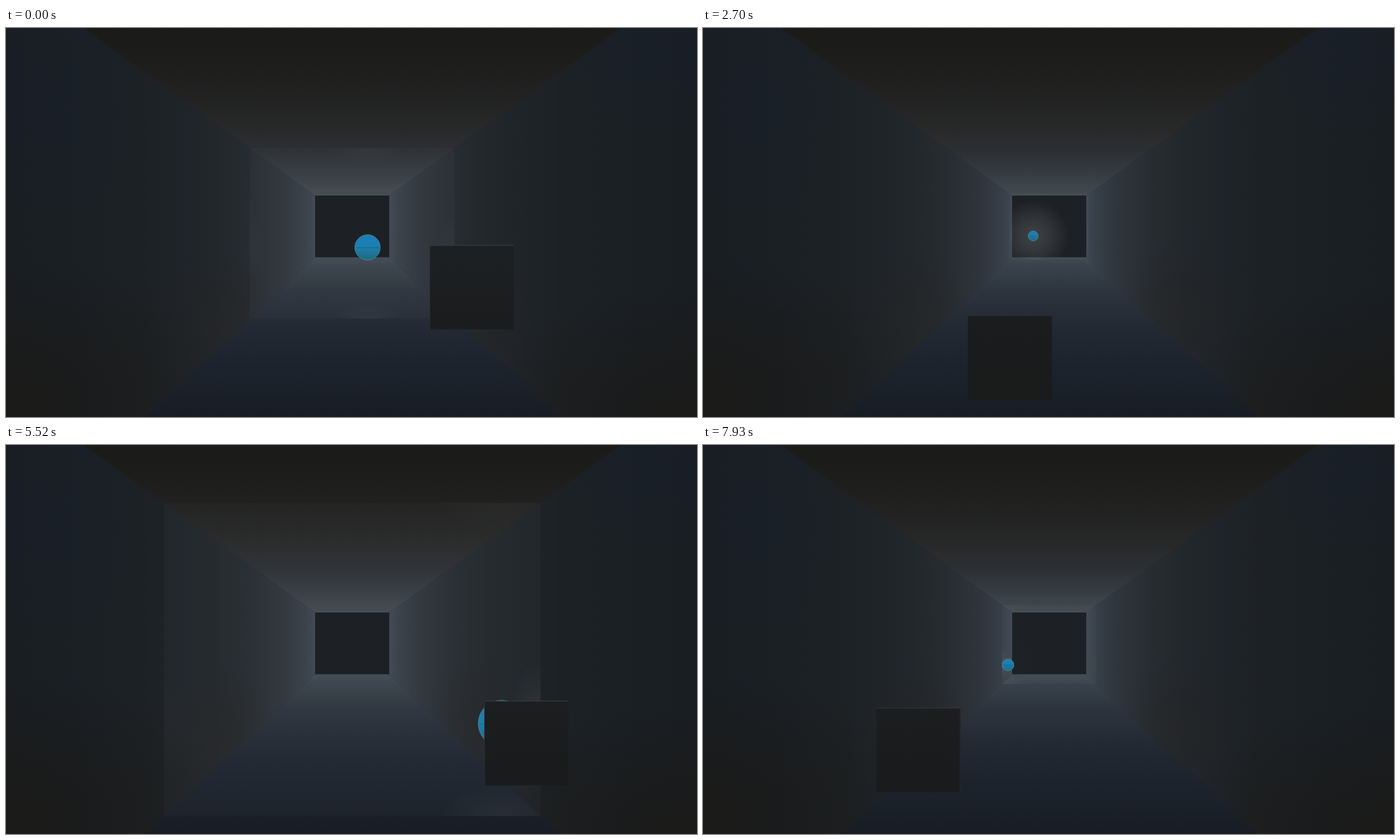
Recreate the animation shown at these times as an HTML page with a canvas. Size 997 px wide and 562 px high, loop 8000 ms.

```html
<!DOCTYPE html>
<html lang="en">
<head>
<meta charset="utf-8">
<title>Tunnel ball</title>
<style>
html, body { margin: 0; width: 100%; height: 100%; overflow: hidden; background: #1a1d20; }
canvas { display: block; }
</style>
</head>
<body>
<canvas id="stage" width="997" height="562"></canvas>
<script>
const W = 997, H = 562, LOOP = 8000;
const ctx = document.getElementById('stage').getContext('2d');

// Vanishing point and tunnel half sizes, measured at the far wall (depth 1)
const VX = 499.5, VY = 281;
const SIDE = 53.5, TOP = 38.8, BOTTOM = 50.2, RADIUS = 6.6;
const PADDLE = 121.5;

const clamp = (v, a, b) => Math.min(b, Math.max(a, v));

function ring(s) {
  return { l: VX - SIDE * s, r: VX + SIDE * s, t: VY - TOP * s, b: VY + BOTTOM * s };
}

function fillPoly(g, points, fill) {
  g.beginPath();
  points.forEach(([x, y]) => g.lineTo(x, y));
  g.closePath();
  g.fillStyle = fill;
  g.fill();
}

// The four faces between the far wall and scale s
function faces(s) {
  const n = ring(s), f = ring(1);
  return {
    left: [[n.l, n.t], [f.l, f.t], [f.l, f.b], [n.l, n.b]],
    right: [[n.r, n.t], [f.r, f.t], [f.r, f.b], [n.r, n.b]],
    ceiling: [[n.l, n.t], [n.r, n.t], [f.r, f.t], [f.l, f.t]],
    floor: [[n.l, n.b], [n.r, n.b], [f.r, f.b], [f.l, f.b]]
  };
}

// stops: [pixel position, colour]
function ramp(g, stops, horizontal) {
  const a = stops[0][0], b = stops[stops.length - 1][0];
  const grad = horizontal ? g.createLinearGradient(a, 0, b, 0) : g.createLinearGradient(0, a, 0, b);
  stops.forEach(([p, c]) => grad.addColorStop((p - a) / (b - a), c));
  return grad;
}

function blob(g, x, y, rx, ry, rgb, alpha) {
  g.save();
  g.translate(x, y);
  g.scale(rx, ry);
  const grad = g.createRadialGradient(0, 0, 0, 0, 0, 1);
  grad.addColorStop(0, `rgba(${rgb},${alpha})`);
  grad.addColorStop(0.5, `rgba(${rgb},${alpha * 0.55})`);
  grad.addColorStop(1, `rgba(${rgb},0)`);
  g.fillStyle = grad;
  g.fillRect(-1, -1, 2, 2);
  g.restore();
}

const wallStops = [
  [0, '#3e4852'], [14, '#373f48'], [45, '#2f353c'], [95, '#272c31'], [145, '#22272c'],
  [195, '#1f2429'], [245, '#1d2124'], [315, '#1b2025'], [446, '#191e23']
];
const ceilingStops = [
  [0, '#1a1b19'], [60, '#1e1e1d'], [100, '#222222'], [140, '#272828'],
  [180, '#2d3033'], [210, '#353b41'], [242, '#434b52']
];
const floorStops = [
  [331, '#424b54'], [345, '#39424b'], [380, '#2d343d'], [419, '#252c35'],
  [450, '#202731'], [490, '#1c232c'], [530, '#1a2028'], [562, '#181d25']
];

function buildRoom() {
  const room = document.createElement('canvas');
  room.width = W;
  room.height = H;
  const g = room.getContext('2d');
  const f = faces(14), back = ring(1);
  g.fillStyle = '#1b1f23';
  g.fillRect(0, 0, W, H);
  fillPoly(g, f.left, ramp(g, wallStops.map(([d, c]) => [back.l - d, c]), true));
  fillPoly(g, f.right, ramp(g, wallStops.map(([d, c]) => [back.r + d, c]), true));
  // Lower parts of the side walls lose their blue and darken
  blob(g, 0, 540, 330, 210, '27,26,24', 0.95);
  blob(g, W, 560, 330, 190, '27,26,24', 0.95);
  blob(g, 300, 420, 90, 110, '38,35,32', 0.4);
  blob(g, 690, 410, 90, 110, '38,35,32', 0.4);
  blob(g, 60, 110, 150, 150, '24,31,42', 0.5);
  blob(g, 930, 40, 130, 90, '24,31,42', 0.6);
  fillPoly(g, f.ceiling, ramp(g, ceilingStops));
  fillPoly(g, f.floor, ramp(g, floorStops));
  g.fillStyle = '#1d2125';
  g.fillRect(446, 242, 107, 89);
  return room;
}
const room = buildRoom();

// The picture advances in short holds of about 108 ms
const BEATS = [210, 1090, 1950, 2800, 3670, 4530, 5410, 6290, 7160];
function heldTime(t) {
  if (t < BEATS[0]) return 0;
  const start = BEATS.filter(b => b <= t).pop();
  return start + Math.min(7, Math.floor((t - start) / 105)) * 108.5;
}

function bounce(t, hit, span, speed, lo) {
  const u = Math.abs((t - hit) * speed) % (2 * span);
  return lo + (u < span ? span - u : u - span);
}

function ballAt(ms) {
  if (ms < BEATS[0]) return { x: 8, y: 13, s: 2.766 };
  const t = ms / 1000, reach = SIDE - RADIUS;
  const depth = bounce(t, 2.52, 0.8125, 0.2635, 0.1745);
  return { x: bounce(t, 1.03, 2 * reach, 40.8, -reach), y: 12.7 + 2.03 * t, s: 1 / depth };
}

// Paddle corner: time, x, y
const PATH = [
  [0, 611, 314], [210, 616, 322], [600, 714, 397], [980, 735, 340], [1350, 791, 318],
  [1840, 611, 314], [2300, 470, 348], [2700, 384, 416], [3050, 290, 423], [3560, 195, 345],
  [3880, 283, 314], [4420, 520, 346], [4900, 640, 405], [5300, 689, 398], [5520, 690, 370],
  [5850, 664, 434], [6180, 562, 369], [6510, 416, 314], [6800, 361, 215], [7160, 470, 280],
  [7400, 488, 315], [7930, 247, 381], [8000, 230, 388]
];

// Cubic through the points, with slopes flattened at turning points
function paddleAt(ms) {
  let i = 0;
  while (i < PATH.length - 2 && PATH[i + 1][0] <= ms) i++;
  const a = PATH[i], b = PATH[i + 1], d = b[0] - a[0], u = clamp((ms - a[0]) / d, 0, 1);
  const slope = (k, c) => {
    const p = PATH[k - 1], q = PATH[k], n = PATH[k + 1];
    if (!p || !n) return 0;
    const m0 = (q[c] - p[c]) / (q[0] - p[0]), m1 = (n[c] - q[c]) / (n[0] - q[0]);
    return m0 * m1 <= 0 ? 0 : 2 * m0 * m1 / (m0 + m1);
  };
  const at = c => {
    const v = u * u * (3 - 2 * u), w = u * (1 - u);
    return a[c] + (b[c] - a[c]) * v + d * w * ((1 - u) * slope(i, c) - u * slope(i + 1, c));
  };
  return { x: Math.round(at(1)), y: Math.round(at(2)) };
}

// The ball lights only what lies farther away than itself
function drawLight(ball) {
  const { x, y, s } = ball, n = ring(s), f = faces(s);
  const bx = VX + x * s, by = VY + y * s, wide = 18 * s, deep = 9 * s;
  const spots = {
    left: [n.l, by, deep, wide, SIDE + x],
    right: [n.r, by, deep, wide, SIDE - x],
    ceiling: [bx, n.t, wide, deep, TOP + y],
    floor: [bx, n.b, wide, deep, BOTTOM - y]
  };
  for (const name in spots) {
    const [cx, cy, rx, ry, gap] = spots[name];
    ctx.save();
    ctx.beginPath();
    f[name].forEach(([px, py]) => ctx.lineTo(px, py));
    ctx.clip();
    ctx.fillStyle = 'rgba(190,200,205,0.025)';
    ctx.fillRect(0, 0, W, H);
    blob(ctx, cx, cy, rx, ry, '205,210,210', 0.11 * Math.exp(-gap / 40));
    ctx.restore();
  }
  const near = clamp((1 / s - 0.7) / 0.25, 0, 1);
  if (near > 0) {
    ctx.save();
    ctx.beginPath();
    ctx.rect(446, 242, 107, 89);
    ctx.clip();
    blob(ctx, bx, by, 52, 52, '200,200,200', 0.24 * near ** 3);
    ctx.restore();
  }
}

function drawBall(ball) {
  const x = VX + ball.x * ball.s, y = VY + ball.y * ball.s, r = RADIUS * ball.s;
  ctx.beginPath();
  ctx.arc(x, y, r, 0, 2 * Math.PI);
  ctx.fillStyle = ramp(ctx, [[y - r, '#1b7db8'], [y, '#1c7fb0'], [y + r, '#1d6a7c']]);
  ctx.fill();
  ctx.lineWidth = 1;
  ctx.strokeStyle = '#3e88a2';
  ctx.stroke();
  ctx.beginPath();
  ctx.moveTo(x - r + 1, y + 0.5);
  ctx.lineTo(x + r - 1, y + 0.5);
  ctx.strokeStyle = '#1f6580';
  ctx.stroke();
}

function drawPaddle({ x, y }) {
  ctx.fillStyle = ramp(ctx, [[290, '#1e2124'], [314, '#1d2023'], [435, '#1b1c1d'], [538, '#191a1a']]);
  ctx.fillRect(x, y, PADDLE, PADDLE);
  ctx.globalAlpha = clamp((412 - y) / 40, 0, 1);
  ctx.fillStyle = '#393e42';
  ctx.fillRect(x, y - 0.5, PADDLE, 1);
  ctx.fillStyle = '#2b2f33';
  ctx.fillRect(x + PADDLE / 2 > VX ? x : x + PADDLE - 1, y, 1, PADDLE);
  ctx.globalAlpha = 1;
}

function render(ms) {
  const t = heldTime(ms), ball = ballAt(t);
  ctx.drawImage(room, 0, 0);
  drawLight(ball);
  drawBall(ball);
  drawPaddle(paddleAt(t));
}

const begin = performance.now();
function tick(now) {
  render(Math.max(0, now - begin) % LOOP);
  requestAnimationFrame(tick);
}
render(0);
requestAnimationFrame(tick);
</script>
</body>
</html>
```
